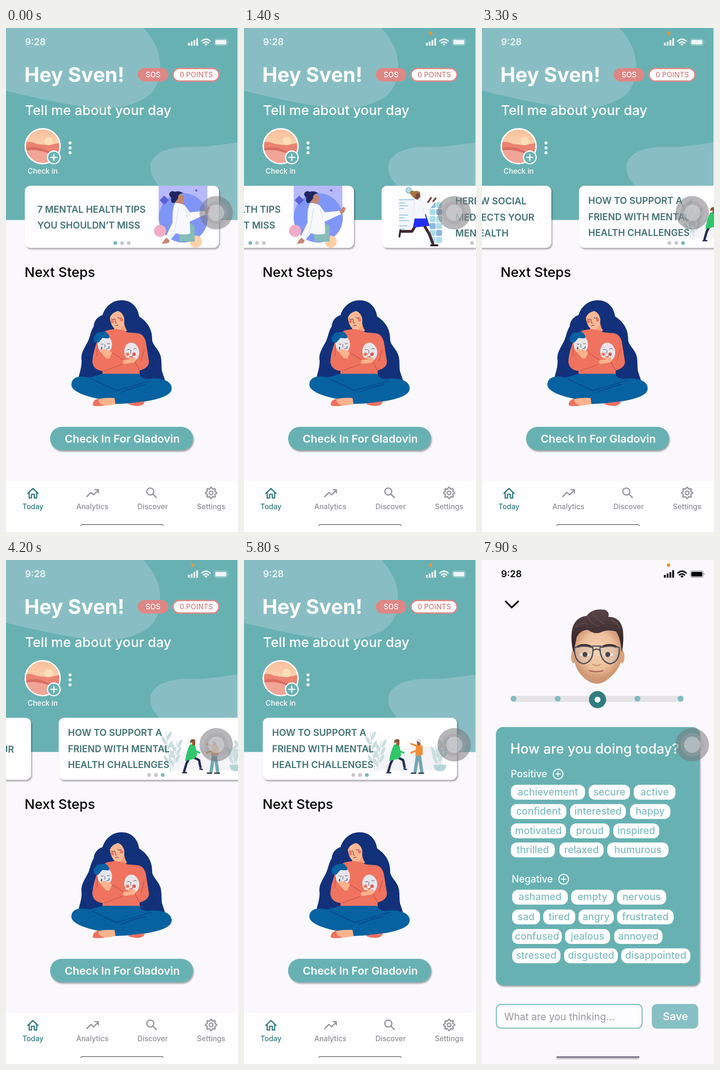
These frames come from a looping animation (500x1083 px, 8 s). An HTML page:

```html
<!DOCTYPE html>
<html lang="en">
<head>
<meta charset="utf-8">
<style>
html, body { margin: 0; width: 100%; height: 100%; overflow: hidden; background: #fff }
svg { display: block; width: 500px; height: 1083px; font: 500 16px Inter, "Open Sans", sans-serif }
text { white-space: pre }
.line { fill: none; stroke-linecap: round; stroke-linejoin: round }
.mid { text-anchor: middle }
.cardText { font-size: 20px; font-weight: 600; fill: #417374 }
.shadow { filter: drop-shadow(2.5px 3px 1.5px #0005) }
</style>
</head>
<body>
<svg viewBox="0 0 500 1083">
<defs>
  <linearGradient id="sky" x2="0" y2="1"><stop stop-color="#f8bd9c"/><stop offset=".5" stop-color="#fad3ac"/></linearGradient>
  <radialGradient id="skin" cy=".4"><stop stop-color="#f6d3b3"/><stop offset=".65" stop-color="#edc09b"/><stop offset="1" stop-color="#cf9774"/></radialGradient>
  <linearGradient id="quiff" x2="0" y2="1"><stop stop-color="#594447"/><stop offset="1" stop-color="#2b1f22"/></linearGradient>
  <clipPath id="round"><circle cx="79" cy="254" r="37"/></clipPath>
  <g id="status">
    <text x="41" y="37" font-size="20" font-weight="600">9:28</text>
    <path d="M392 32h4v6h-4zM398 29h4v9h-4zM404 26h4v12h-4zM410 22h4v16h-4z"/>
    <path class="line" stroke="currentColor" stroke-width="3" d="M422 28Q431 20 440 28M425.500 32Q431 27.500 436.500 32"/>
    <path d="M427.500 34.500Q431 32 434.500 34.500L431 38.500Z"/>
    <rect x="449" y="23.500" width="28" height="14" rx="4" fill="none" stroke="currentColor" opacity=".5"/>
    <rect x="451" y="25.500" width="24" height="10" rx="2.500"/><path d="M478.500 28q2 2.500 0 5z" opacity=".6"/>
  </g>
  <g id="plus" class="line" stroke="#fff" stroke-width="2"><circle r="10.500"/><path d="M-5 0H5M0-5V5"/></g>
</defs>

<g id="home">
  <rect width="499" height="1083" fill="#faf8fc"/>
  <rect width="499" height="412.500" fill="#68b1b3"/>
  <g fill="#88bec3">
    <path d="M0 0H296Q332 38 332 80C332 125 314 147 285 158C255 172 215 174 175 170C110 161 60 149 0 135Z"/>
    <path d="M499 246C470 250 430 256 400 256C350 253 311 270 311 299C311 320 325 333 340 350C365 385 430 412 499 412Z"/>
  </g>
  <use href="#status" fill="#edf6f6" color="#edf6f6"/>
  <g fill="#fff">
    <text x="39.500" y="116" font-size="43.500" font-weight="700">Hey Sven!</text>
    <text x="41" y="187" font-size="29.100">Tell me about your day</text>
    <rect x="284" y="86" width="66" height="29" rx="14.500" fill="#de8785"/>
    <text class="mid" x="317" y="106" font-size="15.500">SOS</text>
    <rect x="360" y="87" width="99" height="27" rx="13.500" stroke="#de8785" stroke-width="3"/>
    <text class="mid" x="410" y="106" font-size="15.500" fill="#d87f7e">0 POINTS</text>
    <circle cx="138" cy="247" r="3.200"/><circle cx="138" cy="257.500" r="3.200"/><circle cx="138" cy="268" r="3.200"/>
    <text class="mid" x="79" y="313" font-size="15.500">Check in</text>
  </g>
  <g clip-path="url(#round)">
    <path fill="url(#sky)" d="M40 215h80v80H40z"/><circle cx="92" cy="243" r="9" fill="#fbdfb8"/>
    <path fill="#ea8471" d="M40 246Q52 242 66 249L92 252L120 246V295H40Z"/>
    <path fill="#d96d62" d="M40 259Q65 252 85 262T120 258V295H40Z"/>
    <path fill="#f1a596" d="M40 264Q65 259 88 268T120 270V295H40Z"/>
  </g>
  <circle cx="79" cy="254" r="37.500" fill="none" stroke="#fff" stroke-width="3"/>
  <circle cx="103" cy="278" r="14" fill="#68b1b3"/>
  <use href="#plus" transform="translate(103 278) scale(1.300)"/>

  <g id="cards">
    <g id="card0">
      <path fill="#b8b9fb" d="M329 339h105v68H329z"/>
      <circle cx="382" cy="408" r="53" fill="#8096f6"/>
      <circle cx="332" cy="436" r="13" fill="#f2adc6"/><circle cx="409" cy="459" r="13" fill="#ffcfa6"/>
      <path fill="#5961d8" d="M331 370l10-10 10 10-10 10zM407 349l3-3 3 3-3 3z"/>
      <path fill="#86bcb9" d="M372 425L393 418L406 425L407 459H374Z"/>
      <path fill="#c8866f" d="M366 361q16-8 18 4l-2 12-8 4-8-6zM347 449l8 4-5 9-14 2 3-6zM428 394l8-10 5 3-3 9-9 5z"/>
      <path fill="#20275f" d="M364 375Q354 380 356 364A7 7 0 1 1 363 352Q374 349 382 355Q370 356 371 366Z"/>
      <path fill="#f7f8fb" d="M365 376Q376 376 385 381L396 396L428 393L431 400L396 416L397 442Q380 446 366 441L353 457L344 449L359 418Q358 385 365 376Z"/>
      <path class="line" stroke="#cfd3e4" d="M386 388L391 408M372 387L365 429L355 452"/>
      <text class="cardText"><tspan x="67.500" y="396.500">7 MENTAL HEALTH TIPS</tspan><tspan x="67.500" y="431">YOU SHOULDN’T MISS</tspan></text>
    </g>
    <g id="card1">
      <g transform="translate(-256)">
        <circle cx="355" cy="349" r="6" fill="#b9ddec" stroke="#85bed9" stroke-width="2"/>
        <rect x="333" y="367" width="36" height="74" fill="#f3f7fd"/>
        <path class="line" stroke="#9cc8ea" stroke-width="2" d="M335 369h31M335 376h12M335 382h18M335 388h9M335 402h18M335 408h10M335 414h20M335 425h16M335 432h10"/>
        <g id="bubbles"></g>
        <path class="line" stroke="#442b2e" stroke-width="6" d="M370 424L362 437L340 437M388 424L399 442L407 463"/>
        <path class="line" stroke="#2a2228" stroke-width="4" d="M337 435l-2 13M403 467h14"/>
        <path fill="#2230ee" d="M369 403L392 400L400 425L364 429Z"/>
        <path fill="#f4f6fa" stroke="#dce3ee" d="M367 369Q376 366 384 371L395 380L407 370L411 376L397 392L386 388L392 409H364L367 382Z"/>
        <path class="line" stroke="#7b4a3e" stroke-width="4" d="M408 372l5-6M397 374l6-9"/>
        <path fill="#7b4a3e" d="M367 352h12l1 11-6 6-7-3z"/>
        <path fill="#a57643" d="M357 355a6 6 0 0 1 10-4q9-3 12 4l-8 1-3 11-5-5z"/>
      </g>
      <text class="cardText"><tspan x="199.500" y="379">HERE’S HOW SOCIAL</tspan><tspan x="199.500" y="414">MEDIA AFFECTS YOUR</tspan><tspan x="199.500" y="448">MENTAL HEALTH</tspan></text>
    </g>
    <g id="card2">
      <path fill="#f4f3f8" d="M280 438Q300 405 332 410Q370 392 400 402Q425 406 430 428L425 452H290Z"/>
      <g id="plants" fill="#cbdee0"></g>
      <path fill="#b3d6d6" d="M409 440H436Q436 454 422.500 454T409 440Z"/>
      <path class="line" stroke="#202c55" stroke-width="5" d="M324 422L316 437L311 454M327 422L343 430L346 445"/>
      <path class="line" stroke="#202c55" stroke-width="3" d="M308 457h8M345 449l5 1"/>
      <path fill="#2fc76a" d="M323 397Q330 394 335 399L339 419L333 427L313 432Q316 411 323 397Z"/>
      <path class="line" stroke="#2fc76a" stroke-width="4" d="M332 401L336 411L344 414"/>
      <path fill="#9e5b3d" d="M327 389h8v9l-6 1z"/><path fill="#84552f" d="M324 394q-2-9 6-9 6 0 5 5l-7 1z"/>
      <path class="line" stroke="#72a7b2" stroke-width="7" d="M374 420L369 454M378 420L383 454"/>
      <path class="line" stroke="#2e3953" stroke-width="3" d="M361 458h9M377 458h10"/>
      <path fill="#f18e38" d="M371 397Q380 393 385 402V419L369 421Z"/>
      <path class="line" stroke="#f18e38" stroke-width="4" d="M373 400L360 395M373 409L360 414"/>
      <path fill="#9a573c" d="M372 389h8v9h-6z"/><path fill="#e3dedd" d="M371 389q2-6 8-4 6 3 2 9l-4-3z"/>
      <text class="cardText"><tspan x="60.500" y="378">HOW TO SUPPORT A</tspan><tspan x="60.500" y="412.500">FRIEND WITH MENTAL</tspan><tspan x="60.500" y="447">HEALTH CHALLENGES</tspan></text>
    </g>
  </g>

  <text x="40" y="535" font-size="29.100">Next Steps</text>

  <g id="woman">
    <path fill="#12317a" d="M249 585C270 585 284 599 287 620C303 630 316 646 315 672C318 684 331 692 334 708C336 722 334 734 338 743L343 758H156C155 748 163 735 163 715C160 700 169 688 174 678C181 668 181 654 189 641C190 628 198 620 208 617C213 600 228 585 249 585Z"/>
    <path fill="#f7a27c" d="M236 632L254 628Q255 642 261 650Q248 658 232 651Z"/>
    <path fill="#fcb894" d="M242 608Q254 613 255 627Q255 640 247 647Q239 651 231 643Q224 633 224 622Q228 611 242 608Z"/>
    <path class="line" stroke="#743d44" stroke-width="1.200" d="M227 625q4 3 7 0M241 622q4 3 7 0M235 626l1 8h3M236 640q4-2 6-1"/>
    <circle cx="229" cy="631" r="3.500" fill="#ef745f"/><circle cx="249" cy="627" r="3.500" fill="#ef745f"/>
    <path fill="#ef735f" d="M217 650Q240 643 262 654L285 656Q299 659 302 678L308 716Q309 730 288 736V746H208V737Q188 735 186 717Q187 698 196 675Q203 656 217 650Z"/>
    <path fill="#0762a1" d="M141 768C140 750 157 746 180 751L209 743H286Q292 754 304 754C320 752 331 753 340 756C356 760 361 774 354 783C341 798 292 806 236 808L200 797C170 791 143 781 141 768Z"/>
    <path class="line" stroke="#0a427f" stroke-width="1.400" d="M185 754Q210 766 238 779L314 757M248 783Q270 773 300 766"/>
    <path fill="#fcb38d" d="M190 803Q198 793 234 795L236 808Q210 814 190 810Z"/>
    <path fill="#ee705e" d="M187 808Q188 799 200 796Q196 807 213 811Q196 814 187 811ZM262 807L299 802Q298 811 284 812Q270 812 262 807Z"/>
    <ellipse cx="213" cy="680" rx="15.500" ry="19" fill="#e8e5ea"/>
    <path fill="#0861a2" d="M191 675Q186 666 192 661Q195 653 205 654Q216 650 220 658Q226 665 220 667L208 666L199 676Z"/>
    <path class="line" stroke="#35405f" d="M205 679q3 2 5 0M218 678q3 2 5 0M213 680v6M216 690q3-3 5-1"/>
    <path fill="#0861a2" d="M206 684q-3 5 0 7 3-2 0-7M222 683q-2 4 0 6 2-2 0-6"/>
    <ellipse cx="271" cy="696" rx="16" ry="20" fill="#e8e5ea" transform="rotate(-8 271 696)"/>
    <path class="line" stroke="#35405f" d="M261 692q3-3 6 0M275 690q4-3 6 0M269 692v7"/>
    <path fill="#d94d50" d="M265 705q6 2 8-2 0 6-4 7z"/><circle cx="262" cy="701" r="3.500" fill="#ef745f"/><circle cx="276" cy="701" r="3.800" fill="#d85b56"/>
    <path fill="#fcb38d" d="M203 691Q214 687 228 697L231 707L219 713L206 699ZM278 708Q282 715 275 719L255 722L247 715Q260 705 278 708Z"/>
    <path fill="#ef735f" d="M189 707L217 710L253 714L250 723L213 736Q188 732 189 707ZM229 697L268 712L252 714L222 711Z"/>
    <path class="line" stroke="#bd4e4b" stroke-width="1.200" d="M197 682L196 705M229 698L253 713M250 723L211 737M278 718L288 736M298 690L291 715"/>
  </g>

  <rect class="shadow" x="95" y="857" width="308" height="50.500" rx="25" fill="#68b1b3"/>
  <text class="mid" x="250.500" y="891" font-size="23.500" font-weight="600" fill="#fff">Check In For Gladovin</text>
  <path fill="#fefdff" d="M0 973h499v110H0z"/>
  <g class="line" stroke="#959399" stroke-width="2.600">
    <path stroke="#2f7d80" d="M47 1000L58 989.500L69 1000M50 998V1010H55V1002H61V1010H66V998"/>
    <path d="M174 1007L183 998L189 1003L199 993M192 992H199V999"/>
    <circle cx="311" cy="996" r="7.500"/><path d="M317 1002L324 1009"/>
    <polygon id="gear" transform="translate(442 999)"/><circle cx="442" cy="999" r="4"/>
  </g>
  <g class="mid" font-size="15.600" fill="#908e94">
    <text x="58" y="1034" fill="#2f7d80">Today</text><text x="186" y="1034">Analytics</text>
    <text x="316" y="1034">Discover</text><text x="442" y="1034">Settings</text>
  </g>
  <path class="line" stroke="#626066" stroke-width="1.600" d="M161 1069Q162 1067 165 1067H335Q338 1067 339 1069"/>
</g>

<g id="checkin">
  <rect width="500" height="1083" fill="#faf8fc"/>
  <use href="#status"/>
  <path fill="none" stroke="#000" stroke-width="3.500" d="M50 88L64 102L79 88"/>
  <g id="avatar">
    <ellipse cx="197" cy="208" rx="5" ry="14" fill="#d9a27d"/><ellipse cx="302" cy="208" rx="5" ry="14" fill="#d9a27d"/>
    <path fill="url(#skin)" d="M196 175Q196 148 249 148T303 175L299 219Q294 238 273 255Q247 277 222 255Q203 239 200 219Z"/>
    <path fill="url(#quiff)" d="M197 199Q189 165 196 143Q204 122 226 120Q237 103 265 107Q276 112 272 122Q300 122 304 153Q306 179 301 199Q299 167 289 154Q272 148 257 155Q243 161 228 150Q211 151 204 166Q201 181 197 199Z"/>
    <path class="line" stroke="#7b6265" stroke-width="1.500" opacity=".6" d="M226 120Q235 138 252 142M239 111Q244 129 264 137M202 144Q213 132 228 138M278 130Q291 132 297 147"/>
    <path class="line" stroke="#39292a" stroke-width="5" d="M207 186Q220 180 234 186M261 186Q275 180 288 186"/>
    <path fill="#fff" d="M210 204Q221 193 233 204Q222 211 210 204ZM261 204Q271 193 283 204Q272 211 261 204Z"/>
    <circle cx="222" cy="203" r="5.500" fill="#32221f"/><circle cx="271" cy="203" r="5.500" fill="#32221f"/>
    <g class="line" stroke="#4c4b55" stroke-width="2.600">
      <path fill="#b6c1cc" fill-opacity=".22" d="M199 188Q218 182 239 188Q241 219 219 223Q199 220 199 188ZM254 188Q274 182 296 188Q297 220 276 223Q255 219 254 188Z"/>
      <path d="M238 185H256M239 195Q247 188 255 195"/>
    </g>
    <path class="line" stroke="#c28b69" stroke-width="2" d="M238 224Q247 230 255 224"/>
    <path class="line" stroke="#a8665a" stroke-width="2.500" d="M232 238Q246 242 260 238"/>
    <path class="line" stroke="#d69b80" stroke-width="2" d="M239 246Q247 249 254 246"/>
  </g>
  <path fill="#e5e3e7" d="M66 292h366v13H66z"/>
  <g fill="#80bdc1"><circle cx="68" cy="298" r="6.300"/><circle cx="163" cy="298" r="6.300"/><circle cx="335" cy="298" r="6.300"/><circle cx="428" cy="298" r="6.300"/></g>
  <circle cx="249" cy="300" r="18.500" fill="#327c80"/><circle cx="249" cy="300" r="6.300" fill="#fff"/>
  <rect class="shadow" x="30" y="359" width="439" height="555" rx="15" fill="#68b1b3"/>
  <g fill="#fff" font-size="20.800">
    <text x="61" y="416" font-size="29.300">How are you doing today?</text>
    <text x="62" y="467">Positive</text><use href="#plus" x="164" y="460"/>
    <text x="64" y="693">Negative</text><use href="#plus" x="176" y="686"/>
    <g id="chips" class="mid"></g>
  </g>
  <rect x="31" y="955" width="314" height="51" rx="10" fill="#fdfcfe" stroke="#86c0c4" stroke-width="2.500"/>
  <text x="48" y="989" font-size="21.300" font-weight="400" fill="#98969c">What are you thinking...</text>
  <rect x="366" y="954" width="100" height="53" rx="11" fill="#86c0c4"/>
  <text class="mid" x="417" y="989" font-size="23" font-weight="600" fill="#fff">Save</text>
  <path class="line" stroke="#302d42" stroke-width="2.500" d="M162 1068H338"/>
</g>

<rect id="bar" x="161" y="1067" width="178" height="6" rx="3" fill="#99979d"/>
<g id="touch">
  <circle cx="453" cy="397" r="36" fill="#77757a" opacity=".52"/>
  <circle cx="453" cy="397" r="25" fill="#a3a1a6" opacity=".4"/>
  <circle cx="453" cy="397" r="17.500" fill="#dfe5e7" opacity=".45"/>
</g>
<circle id="recording" cx="402" cy="11" r="3.700" fill="#f29231"/>
</svg>

<script>
const $ = id => document.getElementById(id);
const PITCH = 478, FRAME = 100, LOOP = 8000;

// Card frames and page dots; each group is drawn at its resting place.
for (let i = 0; i < 3; i++) {
  const card = $('card' + i);
  card.setAttribute('transform', `translate(${i * PITCH})`);
  const box = '<rect class="shadow" x="40.5" y="339" width="418.5" height="133.5" rx="12" fill="#fefdff"/>';
  const dots = [0, 1, 2].map(k =>
    `<circle cx="${235.5 + 14.6 * k}" cy="462" r="4" fill="${k === i ? '#78b9bc' : '#c9c6cc'}"/>`);
  card.innerHTML = box + card.innerHTML + dots.join('');
}

for (let i = 0; i < 12; i++) {
  const x = 400 + i % 2 * 14, y = 374 + (i >> 1) * 15;
  $('bubbles').innerHTML += `<rect x="${x}" y="${y}" width="13" height="13" rx="4" fill="${i % 3 ? '#abdde7' : '#8cb7e1'}"/>`;
}

function plant(x, y, height, lean) {
  let leaves = '';
  for (let i = 0; i < 6; i++) {
    const h = height * (.35 + i * .12), side = i % 2 ? 1 : -1;
    leaves += `<ellipse cx="${x + lean * h / height + side * 7}" cy="${y - h}" rx="3.5" ry="10"
      transform="rotate(${side * 28} ${x + lean * h / height} ${y - h})"/>`;
  }
  return `<path class="line" stroke="#b7d2d5" d="M${x} ${y}l${lean} ${-height}"/>` + leaves;
}
$('plants').innerHTML = plant(282, 454, 84, -10) + plant(286, 454, 66, 10) + plant(421, 440, 40, -8) + plant(423, 440, 58, 9);

$('gear').setAttribute('points', Array.from({ length: 32 }, (_, i) => {
  const r = i % 4 < 2 ? 12 : 9, a = (i - .5) * Math.PI / 16;
  return `${r * Math.cos(a)},${r * Math.sin(a)}`;
}).join(' '));

// Each row: top edge, then word:left:right.
const chipRows = `483 achievement:62:222 secure:230:319 active:327:417
524.5 confident:62:182 interested:190:310 happy:319:406
566 motivated:62:181 proud:190:275 inspired:283:382
607 thrilled:62:157 relaxed:167:262 humurous:270:402
708.5 ashamed:65:185 empty:192:284 nervous:291:397
751 sad:65:125 tired:132:201 angry:208:284 frustrated:291:413
793 confused:65:172 jealous:179:276 annoyed:285:389
834.5 stressed:65:169 disgusted:177:293 disappointed:300:449`;
for (const row of chipRows.split('\n')) {
  const [top, ...words] = row.split(' ');
  for (const item of words) {
    const [word, left, right] = item.split(':');
    $('chips').innerHTML += `<rect x="${left}" y="${top}" width="${right - left}" height="32" rx="13"/>
      <text x="${(+left + +right) / 2}" y="${+top + 22.5}" font-size="21.200" fill="#80bcc0">${word}</text>`;
  }
}

// Carousel path: time, distance, speed.
const panKeys = [[0, 0, 0], [1400, 222, .3], [2400, 575, .34], [4200, 883, .08], [5500, 956, 0]];
function pan(t) {
  const i = panKeys.findIndex(k => t < k[0]);
  if (i < 0) return 2 * PITCH;
  const [t0, x0, v0] = panKeys[i - 1], [t1, x1, v1] = panKeys[i];
  const d = t1 - t0, s = (t - t0) / d, r = 1 - s;
  return r * r * ((1 + 2 * s) * x0 + s * d * v0) + s * s * ((3 - 2 * s) * x1 - r * d * v1);
}

function draw(t) {
  const slide = Math.min(1, Math.max(0, (t - 6450) / 300));
  $('cards').setAttribute('transform', `translate(${-pan(t)})`);
  $('checkin').setAttribute('transform', `translate(0 ${1083 * (1 - slide) ** 2})`);
  $('checkin').style.display = slide > 0 ? '' : 'none';
  $('bar').setAttribute('opacity', slide > 0 ? 1 - .5 * Math.min(1, Math.max(0, (t - 6700) / 600)) : 0);
  $('recording').style.display = t >= FRAME ? '' : 'none';
}

const start = performance.now();
function tick() {
  const t = (performance.now() - start) % LOOP;
  draw(Math.floor(t / FRAME) * FRAME);
  requestAnimationFrame(tick);
}
tick();
</script>
</body>
</html>
```
